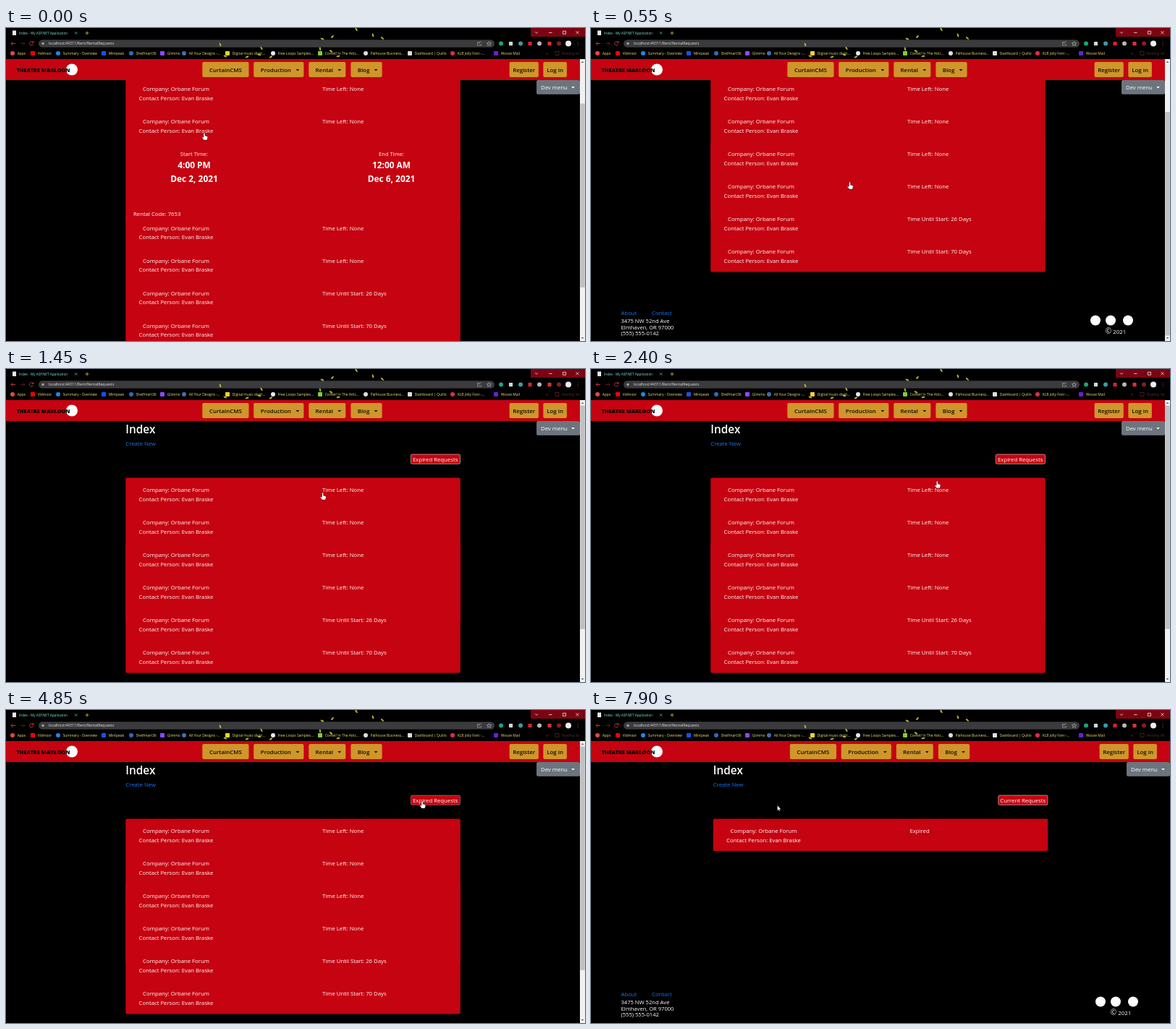
These frames come from a looping animation (800 by 433 pixels, 8 s). An HTML page:

```html
<!DOCTYPE html>
<html lang="en">
<head>
<meta charset="utf-8">
<title>Rental requests</title>
<style>
  html, body { margin: 0; width: 100%; height: 100%; overflow: hidden; background: #000; }
  svg { display: block; width: 100vw; height: 100vh; font: 7.8px "Open Sans", "Noto Sans", sans-serif; }
  text { white-space: pre; }
</style>
</head>
<body>
<svg id="stage" viewBox="0 0 800 433"></svg>
<script>
const LOOP = 8000, RED = '#c60310', GOLD = '#cf962b', LINK = '#0d78f8';
const ROW = 45, DETAIL = 102.5, VIEW = 391, PAGE = 474, MAX_SCROLL = 83;

const rect = (x, y, w, h, fill, more = '') =>
  `<rect x="${x}" y="${y}" width="${w}" height="${h}" fill="${fill}" ${more}/>`;
const dot = (x, y, r, fill) => `<circle cx="${x}" cy="${y}" r="${r}" fill="${fill}"/>`;
const line = (d, color, width = 1) =>
  `<path d="${d}" fill="none" stroke="${color}" stroke-width="${width}"/>`;
// y is the vertical middle of the lowercase and capital letters
const label = (x, y, text, { size = 7.75, fill = '#fff', anchor = 'start', weight = 500 } = {}) =>
  `<text x="${x}" y="${y + size * 0.36}" font-size="${size}" fill="${fill}" ` +
  `text-anchor="${anchor}" font-weight="${weight}">${text}</text>`;
const centered = (x, y, text, more) => label(x, y, text, { anchor: 'middle', ...more });
const group = (id, content, more = '') => `<g id="${id}" ${more}>${content}</g>`;
const caret = (x, y, fill) => `<path d="M${x - 2.3} ${y}h4.6l-2.3 2.4z" fill="${fill}"/>`;

function navButton(x, w, text, menu) {
  return rect(x, 47, w, 21, GOLD, 'rx="2"') +
    centered(x + w / 2 - (menu ? 4 : 0), 58, text, { size: 7.9, fill: '#100c08', weight: 600 }) +
    (menu ? caret(x + w - 8.5, 57, '#100c08') : '');
}

function row(y, status) {
  return centered(235, y + 17, 'Company: Orbane Forum') +
    centered(235, y + 29.5, 'Contact Person: Evan Braske') +
    label(437, y + 17, status);
}

function heading(button) {
  return label(165.3, 83, 'Index', { size: 15.4, weight: 600 }) +
    label(165.3, 103, 'Create New', { fill: LINK }) +
    rect(559.3, 118, 68.2, 13.3, RED, 'id="' + button.split(' ')[0] + '" rx="2" stroke="#fff" stroke-width=".7" stroke-opacity=".7"') +
    centered(593.2, 125, button);
}

function timeBlock(x, title, hour, day) {
  return centered(x, 16.5, title, { size: 7.6 }) +
    centered(x, 32, hour, { size: 11.9, weight: 700 }) +
    centered(x, 51, day, { size: 11.9, weight: 700 });
}

function footer() {
  return label(41.5, 394, 'About', { fill: LINK }) +
    label(84, 394, 'Contact', { fill: LINK }) +
    ['3475 NW 52nd Ave', 'Elmhaven, OR 97000', '(555) 555-0142']
      .map((text, i) => label(41.5, 405.5 + i * 8.4, text, { size: 7.6 })).join('');
}

const social = () => [697, 718, 742].map(x => dot(x, 404.5, 7, '#fff')).join('') +
  centered(725, 420, '<tspan font-size="10">©</tspan> 2021', { size: 7.9 });

function currentPage() {
  const top = rect(165.3, 150.5, 462.4, 200, RED, 'rx="2"') +
    row(150.5, 'Time Left: None') + row(150.5 + ROW, 'Time Left: None');
  const detail = timeBlock(260, 'Start Time:', '4:00 PM', 'Dec 2, 2021') +
    timeBlock(532.5, 'End Time:', '12:00 AM', 'Dec 6, 2021') +
    label(176, 99.5, 'Rental Code: 7653');
  const rest = ['Time Left: None', 'Time Left: None', 'Time Until Start: 26 Days', 'Time Until Start: 70 Days'];
  const lower = rect(165.3, 0, 462.4, 4 * ROW, RED, 'rx="2"') +
    rest.map((status, i) => row(i * ROW, status)).join('');
  return heading('Expired Requests') + top +
    group('detail', detail, 'transform="translate(0 240.5)"') + group('lower', lower) +
    group('footer', footer() + social());
}

const expiredPage = () =>
  group('expiredList', heading('Current Requests') + rect(165.3, 150.5, 462.4, 44.5, RED, 'rx="2"') +
    row(150.5, 'Expired'), 'transform="translate(3.5 0)"') +
  group('expiredFooter', footer() + group('expiredSocial', social(), 'transform="translate(7 0)"'),
    'transform="translate(0 -1)"');

function siteHeader() {
  return rect(0, 43, 800, 29, RED) + dot(91, 57.5, 8, '#fff') +
    label(14.5, 58.5, 'THEATRE MARLOON', { size: 7.4, weight: 800, fill: '#000' }) +
    group('menu', navButton(271.3, 64.2, 'CurtainCMS') + navButton(342.2, 69.2, 'Production', true) +
      navButton(418.3, 51, 'Rental', true) + navButton(476.4, 43.2, 'Blog', true)) +
    group('account', navButton(695.6, 40.2, 'Register') + navButton(742.3, 32.6, 'Log in') +
      rect(733, 72, 60, 19.8, '#6c757d', 'rx="2"') + label(739, 82.3, 'Dev menu') + caret(783.5, 81, '#fff'));
}

const bookmarks = [
  [9, 'Apps', '#e04a3a'], [37, 'Vidmoor', '#f00'], [72, 'Summary - Overview', '#1e88e5'],
  [135, 'Mintpeak', '#1652f0'], [173, 'Shelfmart36', '#2b6cb8'], [216, 'Glimmo', '#9146ff'],
  [246, 'All Your Designs -...', '#3f6fb0'], [306, 'Digital music distri...', '#f2d12b'],
  [369, 'Free Loops Samples...', '#e8e8f0'], [434, 'Comet! In The Attic...', '#7bd12c'],
  [497, 'Palhouse Business...', '#ddd'], [558, 'Dashboard | Quillo', '#ddd'],
  [617, 'KLB Jolly Font -...', '#e22b4b'], [677, 'Wooze Mail', '#6a1fd0']
];
const leaves = [
  [303, 39, 20], [296, 23, 70], [333, 40, -20], [350, 37, 10], [353, 28, 60], [366, 40, -30],
  [434, 29, 80], [437, 15, 20], [451, 12, -50], [449, 32, 30], [459, 39, -10], [484, 2, 60],
  [507, 10, 70], [520, 14, 40]
];
const extensions = [
  [684, '#15a67a'], [697.5, '#cfd8dc'], [711, '#3f9aa8'], [724, '#d8232a'],
  [737, '#b8b8b8'], [751, '#e03030'], [764, '#8c1c24']
];

function browser() {
  const yellow = '#f0e678', pink = '#d23a46';
  return rect(0, 0, 800, 43, '#000') + rect(725, 0, 75, 12, '#7c0412') +
    rect(9, 3.5, 5, 6.5, '#e8e8e8') +
    label(18, 7, 'Index - My ASP.NET Application', { size: 4.7, fill: '#7fe0d4' }) +
    line('M95 5.2l3.4 3.4m0-3.4l-3.4 3.4', '#4fd0c0', .7) + line('M109.5 7h5m-2.5-2.5v5', '#d8c64a', .8) +
    line('M731 5.3l2 2 2-2M750 6.5h4.5M769.5 4.3h4v4h-4zM787.5 4.3l4 4m0-4l-4 4', '#fff', .7) +
    line('M13 21.5h-6m2.6-2.6l-2.6 2.6 2.6 2.6', pink, .9) +
    line('M20 21.5h6m-2.6-2.6l2.6 2.6-2.6 2.6', '#5c1c22', .9) +
    line('M37.5 20a2.7 2.7 0 1 0 .2 2.4M38 18v2.3h-2.3', pink, .9) +
    rect(45, 16.2, 630, 10.6, '#3b3b3d', 'rx="5.3"') + dot(51, 21.5, 1.7, '#a5a5a5') +
    label(59, 21.5, 'localhost:44311/Rent/RentalRequests', { size: 5.2, fill: '#e4e4e4', weight: 400 }) +
    line('M654 19.5h-2.5v4.5h5v-2m-3 0c0-2 1-3 3.5-3', '#bbb', .6) +
    line('M667.5 18.6l.9 2 2.2.2-1.7 1.4.5 2.2-1.9-1.2-1.9 1.2.5-2.2-1.7-1.4 2.2-.2z', '#ccc', .6) +
    extensions.map(([x, color], i) => i % 2 ? rect(x - 2.6, 19, 5.2, 5.2, color, 'rx=".8"') : dot(x, 21.6, 3, color)).join('') +
    dot(777, 21.5, 4, '#f0edf2') + [19, 21.5, 24].map(y => dot(790, y, .6, pink)).join('') +
    leaves.map(([x, y, turn]) => `<ellipse rx="2.5" ry="1.1" fill="#aab637" transform="translate(${x} ${y}) rotate(${turn})"/>`).join('') +
    bookmarks.map(([x, text, color], i) => (i % 2 ? rect(x - 3, 32, 6, 6, color, 'rx="1"') : dot(x, 35, 3, color)) +
      label(x + 6.7, 35, text, { size: 4.9, fill: yellow })).join('') +
    label(746, 35, '»', { size: 6, fill: '#a33' }) + rect(759, 32.5, 5, 5, 'none', 'stroke="#70242a" stroke-width=".7"') +
    label(768, 35, 'Reading list', { size: 4.6, fill: '#4d3030' });
}

const scrollbar = rect(793, 42, 7, 391, '#f1f1f1') +
  '<path d="M794.8 48l1.8-2 1.8 2zM794.8 428l1.8 2 1.8-2z" fill="#555"/>' +
  rect(793.3, 50, 6.4, 100, '#c1c1c1', 'id="thumb"');
const hand = '<path d="M-1 .8Q0-.6 1 .8V4l3.2.9Q5 5.4 4.6 7L3.8 10H-.8L-3.2 6.6Q-3.4 5.2-1 6.2z" fill="#fff" stroke="#222" stroke-width=".5"/>';
const arrow = '<path d="M0 0V7.2L1.7 5.7 2.8 8.1 3.9 7.6 2.8 5.3H5z" fill="#fff" stroke="#222" stroke-width=".4"/>';

document.getElementById('stage').innerHTML =
  rect(0, 0, 800, 433, '#000') + group('current', currentPage()) + group('expired', expiredPage()) +
  siteHeader() + group('scrollbar', scrollbar) + browser() +
  group('cursor', group('hand', hand) + group('arrow', arrow));

const $ = id => document.getElementById(id);
const move = (id, x, y) => $(id).setAttribute('transform', `translate(${x} ${y})`);
const show = (id, on) => $(id).setAttribute('display', on ? 'inline' : 'none');
const ease = (t, from, to) => {
  const p = Math.min(1, Math.max(0, (t - from) / (to - from)));
  return p * p * (3 - 2 * p);
};

const COLLAPSE = [50, 400], SCROLL = [600, 850], SWITCH = 5100;
const cursorPath = [
  [0, 274, 145], [100, 274, 145], [550, 357.5, 213], [1450, 437.5, 171], [3600, 536, 132],
  [4700, 575, 126], [5150, 575, 126], [6000, 516.5, 127.5], [6850, 257.5, 132], [LOOP, 257.5, 132]
];

function cursorAt(t) {
  const i = cursorPath.findIndex(([time]) => time > t);
  const [t0, x0, y0] = cursorPath[i - 1], [t1, x1, y1] = cursorPath[i];
  const p = ease(t, t0, t1);
  return [x0 + (x1 - x0) * p, y0 + (y1 - y0) * p];
}

function render(t) {
  const expired = t >= SWITCH;
  const open = DETAIL * (1 - ease(t, ...COLLAPSE));
  const scroll = MAX_SCROLL * (1 - ease(t, ...SCROLL));
  const height = PAGE + open;

  show('current', !expired);
  show('expired', expired);
  show('scrollbar', !expired);
  show('detail', open > 0);
  move('current', 0, -scroll);
  move('lower', 0, 240.5 + open);
  move('footer', 0, MAX_SCROLL + open);
  move('menu', expired ? 3.5 : 0, 0);
  move('account', expired ? 7 : 0, 0);
  $('thumb').setAttribute('y', 50.5 + 375 * scroll / height);
  $('thumb').setAttribute('height', 375 * VIEW / height);

  const [x, y] = cursorAt(t);
  const onButton = x > 559 && x < 628 && y > 118 && y < 132;
  const onPanel = !expired && y > 150.5 - scroll;
  move('cursor', x, y);
  show('hand', onButton || onPanel);
  show('arrow', !(onButton || onPanel));
  $('Expired').setAttribute('stroke-opacity', onButton ? .4 : .7);
}

const start = performance.now();
function tick() {
  render((performance.now() - start) % LOOP);
  requestAnimationFrame(tick);
}
tick();
</script>
</body>
</html>
```
